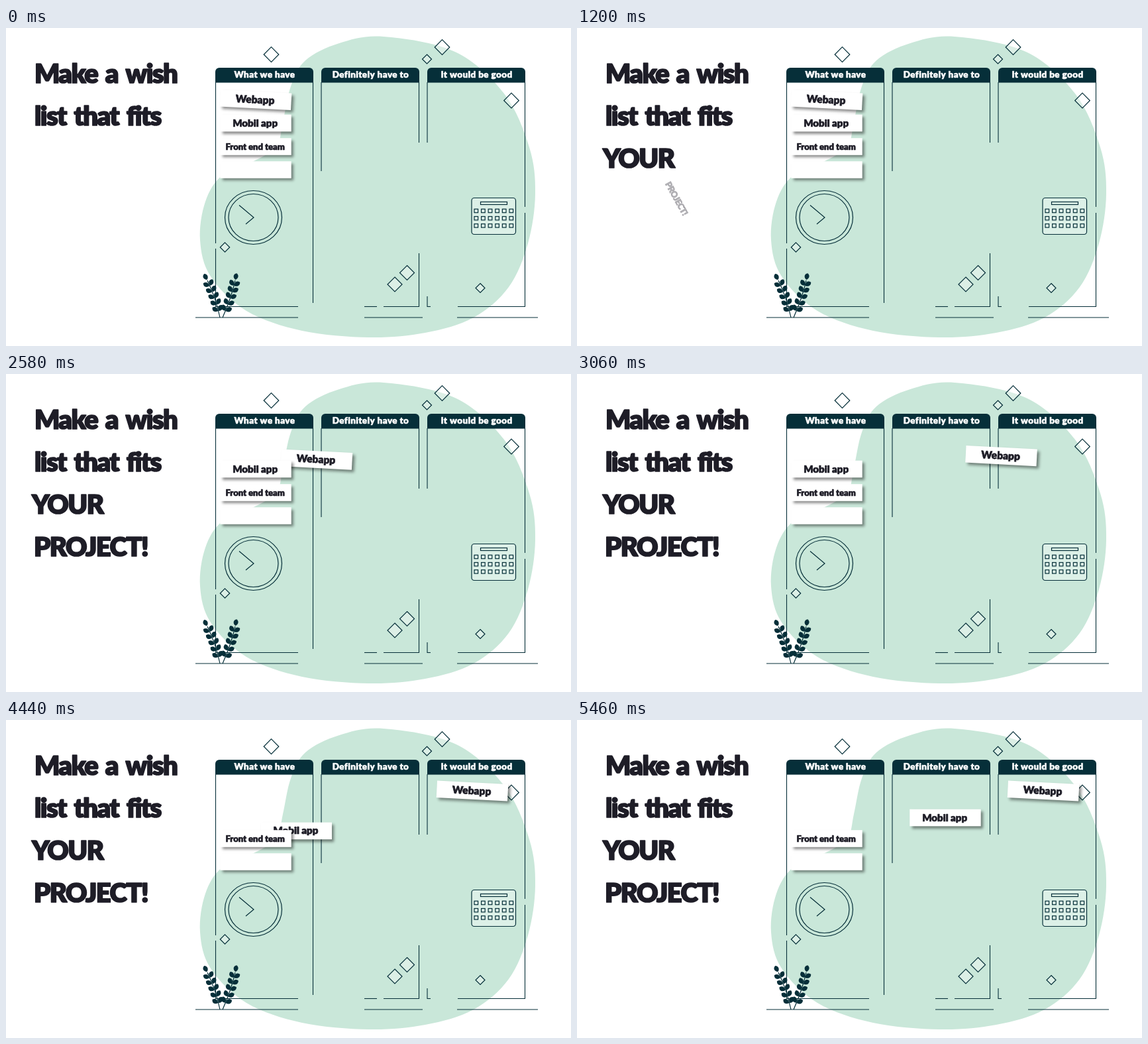
An HTML page with a canvas that plays this animation: 853x480 px, repeating every 5520 ms.

```html
<!DOCTYPE html>
<html lang="en">
<head>
<meta charset="utf-8">
<title>Wish list</title>
<style>
  html, body { margin: 0; width: 100%; height: 100%; overflow: hidden; background: #fff; }
  canvas { display: block; }
</style>
</head>
<body>
<canvas id="stage" width="853" height="480"></canvas>
<script>
const ctx = document.getElementById('stage').getContext('2d');
const LOOP = 5520, STEP = 60;
const INK = '#062f39', TEXT = '#1e1d27', MINT = '#c9e7d9', GLASS = 'rgba(255,255,255,.35)';

const clamp = v => Math.max(0, Math.min(1, v));
const progress = (t, start, length) => clamp((t - start) / length);
const easeInOut = u => u < 0.5
  ? Math.pow(2 * u, 2.4) / 2
  : 1 - Math.pow(2 - 2 * u, 2.4) / 2;

function text(str, x, y, size, { spacing = 0, gap = 0, color = TEXT, align = 'center', weight = 0.7 } = {}) {
  ctx.font = `900 ${size}px Lato, sans-serif`;
  ctx.letterSpacing = spacing + 'px';
  ctx.wordSpacing = gap + 'px';
  ctx.textAlign = align;
  ctx.fillStyle = ctx.strokeStyle = color;
  ctx.lineWidth = weight;
  ctx.lineJoin = 'round';
  ctx.fillText(str, x, y);
  ctx.strokeText(str, x, y);
}

function polyline(...points) {
  ctx.beginPath();
  points.forEach(([x, y]) => ctx.lineTo(x, y));
  ctx.stroke();
}

const vline = (x, y1, y2) => polyline([x, y1], [x, y2]);
const hline = (y, x1, x2) => polyline([x1, y], [x2, y]);

function blob() {
  const pts = [[570, 13], [678, 36], [752, 99], [790, 180], [799, 250], [788, 325], [759, 391],
    [706, 437], [633, 460], [548, 467], [447, 457], [363, 427], [309, 375], [293, 320],
    [301, 262], [327, 222], [380, 198], [409, 178], [418, 142], [430, 88], [452, 49], [503, 23]];
  const at = i => pts[(i + pts.length) % pts.length];
  ctx.beginPath();
  ctx.moveTo(...pts[0]);
  pts.forEach((p, i) => {
    const a = at(i - 1), q = at(i + 1), b = at(i + 2);
    ctx.bezierCurveTo(
      p[0] + (q[0] - a[0]) / 6, p[1] + (q[1] - a[1]) / 6,
      q[0] - (b[0] - p[0]) / 6, q[1] - (b[1] - p[1]) / 6, q[0], q[1]);
  });
  ctx.fillStyle = MINT;
  ctx.fill();
}

function column(x, title) {
  ctx.fillStyle = INK;
  ctx.beginPath();
  ctx.roundRect(x, 60, 148, 22.5, [6, 6, 0, 0]);
  ctx.fill();
  text(title, x + 74.5, 75, 13.4, { spacing: 0.45, color: '#fff', weight: 0.6 });
}

function board() {
  column(316, 'What we have');
  column(476, 'Definitely have to');
  column(636, 'It would be good');
  ctx.strokeStyle = INK;
  ctx.lineWidth = 1.1;
  vline(316.5, 82, 325); vline(316.5, 333, 421); vline(463.5, 82, 415);
  vline(476, 82, 216); vline(623.5, 82, 173); vline(623.5, 340, 421);
  vline(636, 82, 173); vline(636, 405, 421);
  vline(783.5, 82, 270); vline(783.5, 279, 421);
  hline(420.5, 316, 441); hline(420.5, 541, 560); hline(420.5, 570, 624);
  hline(420.5, 636, 641); hline(420.5, 682, 784);
  hline(437, 286, 441); hline(437, 541, 629); hline(437, 681, 803);
}

function pane() {
  ctx.fillStyle = GLASS;
  ctx.fill();
  ctx.stroke();
}

function diamond(x, y, r) {
  ctx.beginPath();
  ctx.moveTo(x, y - r);
  ctx.lineTo(x + r, y);
  ctx.lineTo(x, y + r);
  ctx.lineTo(x - r, y);
  ctx.closePath();
  pane();
}

function clock() {
  for (const [rx, ry] of [[43, 40.5], [37.5, 35.5]]) {
    ctx.beginPath();
    ctx.ellipse(373.5, 286, rx, ry, 0, 0, 7);
    ctx.stroke();
  }
  polyline([352, 267.5], [374, 286], [362, 296]);
}

function calendar() {
  ctx.beginPath();
  ctx.roundRect(703, 256.5, 66.5, 55, 4);
  pane();
  ctx.strokeRect(716.5, 262.5, 40, 4);
  for (let row = 0; row < 3; row++) {
    for (let col = 0; col < 6; col++) ctx.strokeRect(707 + col * 10.6, 273.3 + row * 11.2, 5.6, 5.4);
  }
}

function leaf(x, y, angle) {
  ctx.save();
  ctx.translate(x, y);
  ctx.rotate(angle);
  ctx.beginPath();
  ctx.moveTo(1, 0);
  ctx.bezierCurveTo(4, -5, 9, -5, 11, 0);
  ctx.bezierCurveTo(9, 4, 4, 4.5, 1, 0);
  ctx.fill();
  ctx.restore();
}

// A bent stem with paired leaves and one leaf at the tip.
function sprig(x0, y0, cx, cy, x1, y1) {
  const bend = (a, b, c, u) => (1 - u) * (1 - u) * a + 2 * u * (1 - u) * b + u * u * c;
  const slope = (a, b, c, u) => 2 * (1 - u) * (b - a) + 2 * u * (c - b);
  const pairs = 5;
  ctx.beginPath();
  ctx.moveTo(x0, y0);
  ctx.quadraticCurveTo(cx, cy, x1, y1);
  ctx.stroke();
  for (let i = 0; i <= pairs; i++) {
    const u = i < pairs ? 0.16 + i * 0.17 : 1;
    const x = bend(x0, cx, x1, u), y = bend(y0, cy, y1, u);
    const dir = Math.atan2(slope(y0, cy, y1, u), slope(x0, cx, x1, u));
    if (i === pairs) leaf(x, y, dir);
    else { leaf(x, y, dir - 0.75); leaf(x, y, dir + 0.75); }
  }
}

function decor() {
  ctx.strokeStyle = INK;
  ctx.lineWidth = 1.2;
  ctx.lineJoin = 'miter';
  [[400.5, 40, 11.3], [658.5, 29, 11.3], [635.5, 47, 7], [763, 109.5, 11.3], [330.5, 331, 7.2],
    [605.5, 369.5, 11], [587, 387, 11], [716, 392.5, 7]].forEach(d => diamond(...d));
  clock();
  calendar();
  ctx.fillStyle = INK;
  sprig(323, 437, 317, 408, 304, 381);
  sprig(327, 437, 340, 408, 346, 381);
}

function card(x, y, label, size, tilt = 0) {
  ctx.save();
  ctx.translate(x, y);
  ctx.rotate(tilt * Math.PI / 180);
  ctx.save();
  ctx.shadowColor = 'rgba(0,0,0,.45)';
  ctx.shadowBlur = 4;
  ctx.shadowOffsetX = ctx.shadowOffsetY = 3.5;
  ctx.fillStyle = '#fff';
  ctx.fillRect(-53.7, -12.8, 107.4, 25.6);
  ctx.restore();
  if (label) text(label, -0.9, 5, size);
  ctx.restore();
}

// Slides a card along a sagging arc.
function slidingCard(t, start, x, y, dx, dy, sag, ...rest) {
  const p = easeInOut(progress(t, start, 1780));
  card(x + dx * p, y + dy * p + 4 * sag * p * (1 - p), ...rest);
}

function heading(str, x, baseline) {
  text(str, x, baseline, 40, { spacing: -1.6, gap: 4, align: 'left', weight: 1.7 });
}

// Grows, fades and turns a heading line into place.
function tumble(t, start, str, x, baseline) {
  const u = progress(t, start, 900);
  if (!u) return;
  const px = 153, py = baseline - 10;
  ctx.save();
  ctx.globalAlpha = u;
  ctx.translate(px, py);
  ctx.rotate((1 - u) * Math.PI / 2);
  ctx.scale(u, u);
  ctx.translate(-px, -py);
  heading(str, x, baseline);
  ctx.restore();
}

function draw(now) {
  const time = now % LOOP;
  const t = time < 2 * STEP ? 0 : Math.floor(time / STEP) * STEP;
  ctx.fillStyle = '#fff';
  ctx.fillRect(0, 0, 853, 480);
  blob();
  board();
  decor();
  slidingCard(t, 1880, 377, 108.5, 327, -1.5, 26, 'Webapp', 15.5, 3);
  slidingCard(t, 3680, 377, 143.5, 179, 4, 25, 'Mobil app', 15);
  card(377, 179, 'Front end team', 13);
  card(377, 214);
  heading('Make a wish', 43, 83);
  heading('list that fits', 43, 147);
  tumble(t, 40, 'YOUR', 39, 211);
  tumble(t, 910, 'PROJECT!', 42, 275);
}

const begin = performance.now();
function tick() {
  draw(performance.now() - begin);
  requestAnimationFrame(tick);
}
tick();
</script>
</body>
</html>
```
